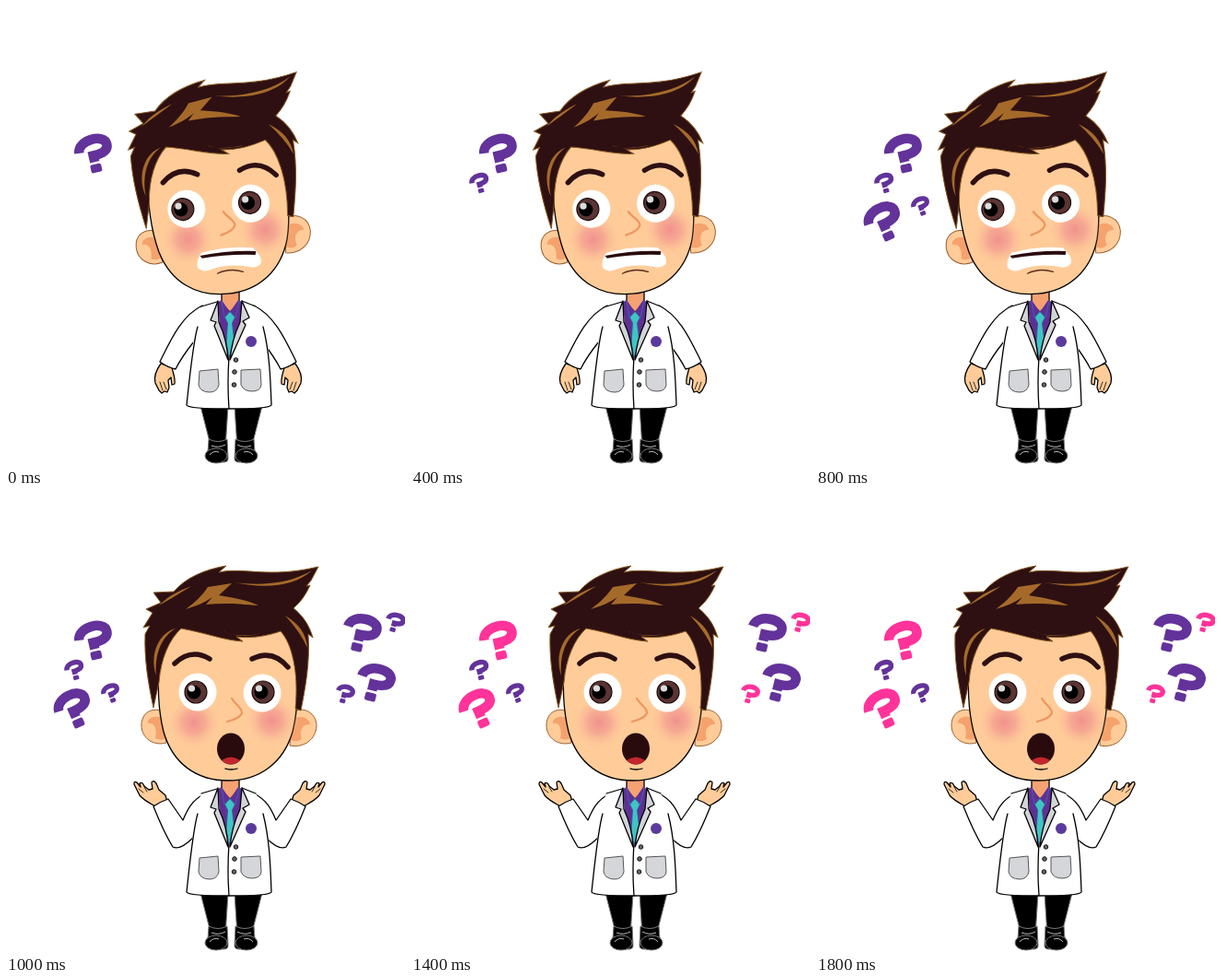
Animation, 433 px wide and 498 px high, one loop 2 s. Source, as an HTML page:

```html
<!DOCTYPE html>
<html lang="en">
<head>
<meta charset="utf-8">
<title>Puzzled scientist</title>
<style>
  html, body { margin: 0; width: 100%; height: 100%; overflow: hidden; background: #fff; }
  svg { display: block; }
  .ink { stroke: #000; stroke-width: 1.3; stroke-linejoin: round; stroke-linecap: round; }
  .skin { fill: #ffcc99; }
  .line { fill: none; }
  .hair { fill: #2e1012; stroke: #85571f; stroke-width: 1; }
  .gold { fill: #a56a2a; }
  .brow { fill: none; stroke: #2e1012; stroke-width: 5.5; stroke-linecap: round; }
</style>
</head>
<body>
<svg width="433" height="498" viewBox="0 0 433 498">
  <defs>
    <radialGradient id="blush">
      <stop offset="0" stop-color="#f08f8c" stop-opacity=".95"/>
      <stop offset=".4" stop-color="#f29a90" stop-opacity=".7"/>
      <stop offset="1" stop-color="#ffcc99" stop-opacity="0"/>
    </radialGradient>
    <g id="mark">
      <path d="M-16.500-5C-15-20 15-20 15-8C15-1 8 1-2 1V8" fill="none" stroke="currentColor" stroke-width="10.500"/>
      <rect x="-8" y="10.500" width="12" height="9" rx="2" fill="currentColor"/>
    </g>
    <g id="iris">
      <circle r="12" fill="#5b3434" stroke="#1d0b0b" stroke-width="1.2"/>
      <circle cx="-2" cy="0" r="7.500"/>
      <circle cx="-4.500" cy="-4" r="3.600" fill="#dcdcdc"/>
    </g>
    <g id="armDown" class="ink">
      <path class="skin" d="M168 388C163 395 160 402 162 409L166 417L169 420L172 418L175 419L177 414L176 406L179 403L180 411L183 410C184 403 181 398 180 392Z"/>
      <path class="line" d="M167 408L170 417M171 408L174 416" stroke-width=".8"/>
      <path fill="#fff" d="M213 325C190 336 178 364 167 386Q175 392 184 394C190 382 196 374 204 364Z"/>
    </g>
    <g id="armUp" class="ink">
      <path class="skin" d="M164 341C157 337 150 334 145 328L139 316Q139 312 142 314L146 319L145 315Q148 313 150 318L155 322L159 321L158 314Q160 311 163 315L166 322L173 328L175 335Z"/>
      <path class="line" d="M144 321L149 325M150 319L153 324" stroke-width=".8"/>
      <path fill="#fff" d="M216 326C202 333 197 343 192 355L176 332Q167 335 160 340C166 355 173 371 181 384Q189 388 203 374Z"/>
    </g>
    <g id="leg" stroke="#777" stroke-width="1">
      <path d="M211 434H241L238.500 473H221Z"/>
      <path d="M220 470Q230 475 240 470L241 491Q241 495 236 495H226L219 484Z"/>
      <ellipse cx="228" cy="488" rx="12" ry="8"/>
      <path d="M221 487Q225 482 231 484M223 477Q231 480 238 476" fill="none" stroke="#bbb"/>
    </g>
  </defs>

  <use href="#leg"/>
  <use href="#leg" transform="matrix(-1 0 0 1 489 0)"/>

  <g id="down">
    <use href="#armDown"/>
    <use href="#armDown" transform="matrix(-1 0 0 1 482 0)"/>
  </g>
  <g id="up">
    <use href="#armUp"/>
    <use href="#armUp" transform="matrix(-1 0 0 1 485 0)"/>
  </g>

  <path class="ink" fill="#f5a273" d="M234 308H253V323L243 332L234 323Z"/>
  <path fill="#fff" d="M229 321L212 326C204 345 203 365 201 385L196 433Q198 437 242 437Q286 437 288 433C287 400 286 370 281 345L271 326L256 320L243 345Z"/>
  <path class="ink line" d="M229 321L212 326M256 320L271 326M208 348C203 365 199 405 196 433Q198 437 242 437Q286 437 288 433C287 405 286 375 279 348M242 380Q240 410 242 437"/>
  <path fill="#5f2f95" d="M230 321L234 319L243 332L252 319L256 321L254 345L243 380L232 345Z"/>
  <path fill="#3fc4c4" stroke="#35548f" stroke-width=".8" d="M243 331L248.500 338L245.500 344L248 366L242 381L239 366L240.500 344L237.500 338Z"/>
  <path d="M234 320L237 338L243 332L249 338L253 320" fill="none" stroke="#3a6fae" stroke-width=".8"/>
  <g class="ink" fill="#d3d4d8">
    <path d="M230 320L222 341L228 343L226 347L241 384Q240 362 231 343Z"/>
    <path d="M256 320L264 338L257 342L260 346L243 384Q245 362 254 343Z"/>
  </g>
  <g fill="#d5d6da" stroke="#555">
    <path d="M210 396L230 394L231 411Q229 419 221 419Q211 419 209 411Z"/>
    <path d="M255 395L276 394L277 411Q276 418 267 418Q258 418 255 411Z"/>
  </g>
  <g fill="#666" stroke="#111">
    <circle cx="249.500" cy="384" r="2.300"/><circle cx="248" cy="397" r="2.300"/><circle cx="247.500" cy="411" r="2.300"/>
  </g>
  <circle cx="266" cy="364" r="6" fill="#5a3a9c"/>

  <g id="head">
    <g class="skin" stroke="#9a5f30">
      <path d="M170 237C159 232 147 238 147 252C147 266 160 275 174 271Z"/>
      <path d="M310 237C324 231 337 239 337 253C336 267 324 277 308 274Z"/>
    </g>
    <path fill="#f5a26d" d="M172 245C161 239 153 245 154 250C162 248 164 258 162 266Q168 269 174 266ZM311 246C321 239 330 246 330 251C321 250 318 259 321 267Q316 271 309 268Z"/>
    <path class="skin ink" d="M167 170C164 210 165 235 171 259C181 294 207 312 241 312C275 312 301 293 311 259C317 235 318 205 315 170L290 130H190Z"/>
    <circle cx="204" cy="249" r="30" fill="url(#blush)"/>
    <circle cx="288" cy="247" r="30" fill="url(#blush)"/>
    <path class="hair" d="M160 233C154 205 150 180 151 153L156 144L149 146L159 130L152 126L168 119L160 108L182 107C195 92 215 83 239 79L231 86C258 80 285 93 339 80L331 95L326 101L330 100C326 109 321 117 312 125C322 133 329 143 333 157L328 153C330 185 325 210 320 236L314 234C316 214 315 196 312 182C309 168 305 158 298 150C283 155 268 158 250 156L257 161C237 160 218 152 190 147C177 159 168 180 166 205Z"/>
    <path class="gold" d="M195 126C205 119 214 110 219 102L245 98L231 111C250 114 263 117 274 122C251 120 235 119 217 121L224 113C215 119 206 123 195 126ZM248 97C278 101 309 98 332 84C313 102 280 104 248 97ZM303 133C318 142 326 153 327 168C321 155 313 144 303 133ZM184 147C169 156 161 174 163 198C155 174 167 151 184 147ZM234 149Q246 157 276 153Q250 158 234 149ZM166 122C177 111 188 106 201 101C187 110 178 115 166 122Z"/>
    <path class="brow" d="M183 185Q201 168 221 180M267 180Q289 169 306 189"/>
    <g id="eyes">
      <circle cx="208" cy="216" r="20.500" fill="#fff"/>
      <circle cx="278" cy="217" r="20.500" fill="#fff"/>
      <g id="pupils">
        <use class="iris" href="#iris"/>
        <use class="iris" href="#iris"/>
      </g>
    </g>
    <path d="M245 223C250 231 257 234 256 239Q253 245 240 248" fill="none" stroke="#ee9660" stroke-width="2.300" stroke-linecap="round"/>
    <g id="gasp">
      <ellipse cx="244" cy="277.500" rx="15" ry="17" fill="#2a0b0d"/>
      <path fill="#c3272d" d="M234 290Q244 283 254 290Q244 299 234 290Z"/>
      <path class="ink line" d="M238 299Q245 301 251 299"/>
    </g>
    <g id="grimace">
      <path fill="#fff" d="M217 265Q245 260 273 265Q283 276 280 283Q275 288 266 285Q245 279 225 284Q215 287 211 280Q211 271 217 265Z"/>
      <path fill="#2a0b0d" d="M215 268Q245 265 276 269L275 273Q245 269 217 271Z"/>
      <path class="ink line" d="M232 289Q246 284 260 290" style="stroke:#5a2a1a"/>
    </g>
  </g>
  <g id="marks"></g>
</svg>
<script>
const STEP = 200, PURPLE = '#63329a', PINK = '#ff3399';
const $ = id => document.getElementById(id);
const show = (id, on) => $(id).style.display = on ? '' : 'none';
const move = (el, x, y, rest = '') => el.setAttribute('transform', `translate(${x} ${y}) ${rest}`);
const irises = document.querySelectorAll('.iris');

// x, y, scale, angle: four on the left, four on the right
const marks = [
  [96.500, 161, 1, -13], [75, 192.500, .52, -16], [74.500, 235, 1, -24], [114.500, 217.500, .5, -20],
  [386, 153, 1, 13], [422.500, 141, .52, 14], [401, 207, 1, 14], [368, 218.500, .5, 14]
].map(([x, y, scale, angle], i) => {
  const el = document.createElementNS('http://www.w3.org/2000/svg', 'use');
  el.setAttribute('href', '#mark');
  $('marks').append(el);
  return { el, x, y, scale, angle, right: i > 3, rank: i % 4 };
});
const leftCount = [1, 0, 2, 0, 4], rightCount = [0, 2, 0, 4, 0];

function draw(step) {
  const shrug = step >= 5;
  const toRight = !shrug && step % 2 === 1;
  const tilt = shrug ? 0 : toRight ? 7.2 : -5.7;
  const lowered = step === 6 || step === 8;

  $('head').setAttribute('transform', `rotate(${tilt} 243 315)`);
  move($('eyes'), shrug ? 0 : -2.5, 0);
  move($('pupils'), shrug ? 0 : toRight ? 3.5 : -2, toRight ? -2 : 0);
  irises.forEach((iris, i) => move(iris, i ? 279 : 206, 216, `scale(${toRight ? -1 : 1} 1)`));
  move($('up'), 0, lowered ? 4 : 0);
  show('gasp', shrug);
  show('up', shrug);
  show('grimace', !shrug);
  show('down', !shrug);

  for (const m of marks) {
    const count = shrug ? 4 : (m.right ? rightCount : leftCount)[step];
    const [dx, dy] = m.right && !shrug ? [-1.5, -4] : [0, 0];
    const odd = (m.rank + m.right) % 2 === 1;
    m.el.style.display = m.rank < count ? '' : 'none';
    m.el.style.color = step > 5 && odd === lowered ? PINK : PURPLE;
    move(m.el, m.x + dx, m.y + dy, `rotate(${m.angle}) scale(${m.scale})`);
  }
}

function tick() {
  draw(Math.floor(performance.now() / STEP) % 10);
  requestAnimationFrame(tick);
}
tick();
</script>
</body>
</html>
```
